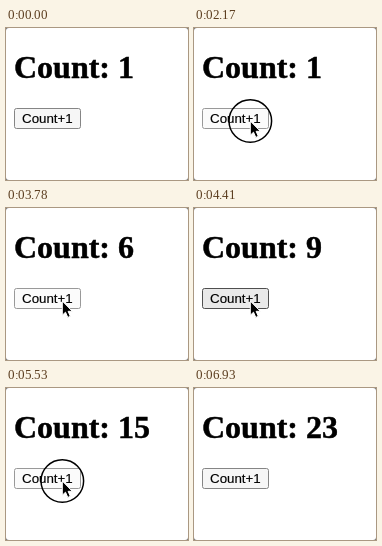
An HTML page for the animation above (7140 ms loop, 182x152 px).

```html
<!DOCTYPE html>
<html lang="en">
<head>
<meta charset="utf-8">
<title>Counter</title>
<style>
  html, body { margin: 0; width: 100%; height: 100%; overflow: hidden; background: #777; }
  svg { display: block; width: 182px; height: 152px; }
  text { stroke: #000; }
  #title { font: bold 32px "Liberation Serif", "Times New Roman", serif; stroke-width: .5px; }
  #label { font: 13.333px "Liberation Sans", Arial, sans-serif; stroke-width: .15px; }
  #button { fill: #f6f6f6; stroke: #858585; }
  #button.hover { fill: #e9e9e9; stroke: #4f4f4f; }
  #button.pressed { fill: #fbfbfb; stroke: #999; }
</style>
</head>
<body>
<svg viewBox="0 0 182 152">
  <rect width="182" height="152" rx="3" fill="#fff"/>
  <text id="title" x="8" y="50"></text>
  <rect id="button" x="8.5" y="80.5" width="66" height="20" rx="2"/>
  <text id="label" x="16" y="95">Count+1</text>
  <g id="pointer">
    <circle id="halo" r="21.3" fill="none" stroke="#000" stroke-width="1.5"/>
    <path d="M0 0V14.2L3.2 11.2L5.5 16.4L8 15.3L5.8 10.3H10Z" stroke="#fff" stroke-linejoin="round"/>
  </g>
</svg>
<script>
const LOOP = 7140, STEP = 70, LAST_COUNT = 23;
const [title, button, halo, pointer] =
  ["title", "button", "halo", "pointer"].map(id => document.getElementById(id));

// count, time: slow clicking that speeds up
const pace = [[2, 2310], [10, 4740], [11, 4970], [15, 5460], [LAST_COUNT, 6580]];

// time, x, y of the pointer tip: enter, wait, go to the button, click, leave
const path = [
  [420, 140, 149], [770, 126.5, 129], [1400, 126.5, 129], [1470, 116.5, 127],
  [1610, 62, 98], [2100, 56.3, 93], [6720, 56.3, 93], [6930, 86, 152]
];

// Linear interpolation of every column after the first; null outside the keys
function interpolate(keys, at) {
  const i = keys.findIndex(key => key[0] >= at);
  if (i < 1) return null;
  const a = keys[i - 1], b = keys[i];
  const k = (at - a[0]) / (b[0] - a[0]);
  return a.slice(1).map((v, j) => v + (b[j + 1] - v) * k);
}

const clicks = [];
for (let count = 2; count <= LAST_COUNT; count++) {
  const [time] = interpolate(pace, count) || pace[0].slice(1);
  const up = Math.round(time / STEP) * STEP;
  const slow = count <= 10;
  clicks.push({ up, down: up - (slow ? 3 : 1) * STEP, haloEnd: slow ? up - STEP : up });
}

function draw(t) {
  const tip = interpolate(path, t);
  const click = clicks.find(c => t >= c.down && t < c.up);
  const haloOn = click ? t < click.haloEnd : t >= 840 && t < 1050;
  const hover = tip && tip[0] < 75 && tip[1] > 80 && tip[1] < 101;

  title.textContent = "Count: " + (1 + clicks.filter(c => t >= c.up).length);
  button.setAttribute("class", click ? "pressed" : hover ? "hover" : "");
  pointer.style.display = tip ? "" : "none";
  halo.style.display = haloOn ? "" : "none";
  if (tip) pointer.setAttribute("transform", `translate(${tip})`);
}

const start = performance.now();
function tick() {
  const t = (performance.now() - start) % LOOP;
  draw(Math.floor(t / STEP) * STEP);
  requestAnimationFrame(tick);
}
tick();
</script>
</body>
</html>
```
